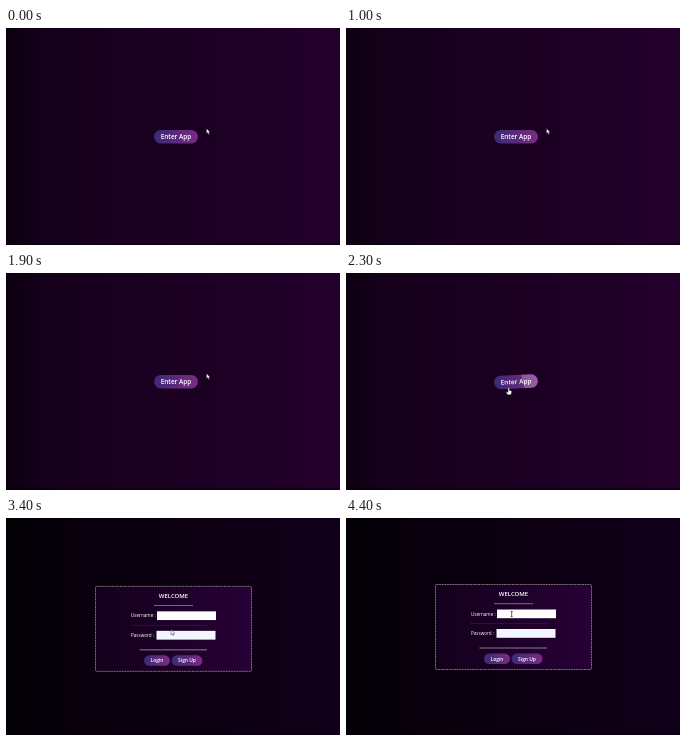
Recreate the animation shown at these times as an HTML page. Size 334 by 217 pixels, loop 4.5 s.

```html
<!DOCTYPE html>
<html lang="en">
<head>
<meta charset="utf-8">
<title>Enter App</title>
<style>
  html, body { margin: 0; width: 100%; height: 100%; overflow: hidden; background: #0c0012; }
  svg { display: block; width: 334px; height: 217px; }
  text { font-family: "Open Sans", "Noto Sans", sans-serif; font-weight: 600; fill: #fff; text-anchor: middle; }
  .label { font-size: 4.6px; font-weight: 500; text-anchor: start; }
</style>
</head>
<body>
<svg viewBox="0 0 334 217">
  <defs>
    <linearGradient id="page">
      <stop offset="0" stop-color="#0c000f"/>
      <stop offset=".1" stop-color="#14001a"/>
      <stop offset=".45" stop-color="#1a0021"/>
      <stop offset="1" stop-color="#22002b"/>
    </linearGradient>
    <linearGradient id="dim">
      <stop offset="0" stop-color="#030005"/>
      <stop offset=".2" stop-color="#08000c"/>
      <stop offset="1" stop-color="#12001a"/>
    </linearGradient>
    <linearGradient id="panel">
      <stop offset="0" stop-color="#14001c"/>
      <stop offset="1" stop-color="#270036"/>
    </linearGradient>
    <linearGradient id="pill">
      <stop offset="0" stop-color="#3b2a74"/>
      <stop offset="1" stop-color="#7a2a84"/>
    </linearGradient>
    <clipPath id="pillClip"><rect x="148" y="102" width="44" height="13.5" rx="6.75"/></clipPath>
  </defs>

  <rect width="334" height="217" fill="url(#page)"/>
  <rect id="shade" width="334" height="217" fill="url(#dim)"/>
  <rect y="215" width="334" height="2" fill="#08000b" opacity=".6"/>

  <g id="enter">
    <rect x="148" y="102" width="44" height="13.5" rx="6.75" fill="url(#pill)"/>
    <path id="shine" d="M175 101H193V117H179Z" fill="#fff" opacity=".23" clip-path="url(#pillClip)"/>
    <text x="170" y="111" font-size="6.45">Enter App</text>
  </g>

  <g id="dialog">
    <rect x="89.5" y="66.5" width="156" height="85" rx="1" fill="url(#panel)" stroke="#8d878c" stroke-width=".8" stroke-dasharray="2 .6"/>
    <text x="167.5" y="78.4" font-size="6">WELCOME</text>
    <path d="M148 85.7H187" stroke="#8f8794" stroke-width=".8"/>
    <path d="M125 105.5H201" stroke="#4a3154" stroke-width=".6" stroke-dasharray="1 .6"/>
    <path d="M133.500 130H201" stroke="#a49ca8" stroke-width=".8"/>
    <text class="label" x="125" y="97.500">Username :</text>
    <text class="label" x="125" y="117">Password :</text>
    <rect x="151" y="91.500" width="59" height="8.700" fill="#fff"/>
    <rect x="150.500" y="111" width="59" height="8.800" fill="#f4f6ff"/>
    <rect x="138" y="135.500" width="26" height="10.500" rx="5.250" fill="url(#pill)"/>
    <rect x="165.500" y="135.500" width="31" height="10.500" rx="5.250" fill="url(#pill)"/>
    <text x="151" y="142.500" font-size="4.900">Login</text>
    <text x="181" y="142.500" font-size="4.900">Sign Up</text>
  </g>

  <g id="cursor">
    <path id="arrow" d="M0 0V5.200L1.200 4.100L2.100 6L3 5.600L2.200 3.800H3.700Z" fill="#fff" stroke="#111" stroke-width=".4"/>
    <path id="hand" d="M-.7 .5Q0 -.5 .7 .5V2.900L2.500 3.300Q3.200 3.600 3 4.500L2.300 7.300H-1.200L-2.600 4.800Q-2.700 3.900 -1.800 4.200L-.7 5Z" fill="#fff" stroke="#111" stroke-width=".4"/>
    <path id="beam" d="M-1 0H1M0 0V5.200M-1 5.200H1" fill="none" stroke="#222" stroke-width=".7"/>
  </g>
</svg>
<script>
const LOOP = 4500, STEP = 100, OPEN = 3200;
const el = id => document.getElementById(id);
const show = (id, on) => el(id).style.display = on ? "" : "none";
const move = (id, value) => el(id).setAttribute("transform", value);

// Cursor stops: time, x, y
const path = [
  [0, 200.5, 100.5], [1900, 200.5, 100.5], [2300, 162.7, 114.5],
  [2400, 165, 111.6], [3700, 165, 111.6], [4200, 165.7, 93.5], [LOOP, 165.7, 93.5]
];

function cursorAt(t) {
  const i = path.findIndex(p => p[0] > t);
  const [t0, x0, y0] = path[i - 1], [t1, x1, y1] = path[i];
  const k = (t - t0) / (t1 - t0), e = k * k * (3 - 2 * k);
  return [x0 + (x1 - x0) * e, y0 + (y1 - y0) * e];
}

function draw(t) {
  const [x, y] = cursorAt(t);
  const open = t >= OPEN;
  const hover = !open && x < 191;

  const wobble = t >= 2200 && t < 3000
    ? -2.4 * Math.cos(Math.PI * (t - 2300) / 200) * (3000 - t) / 700 : 0;
  move("enter", `rotate(${wobble} 170 108.7)`);
  show("enter", !open);
  show("shine", hover);

  // The panel springs up from below and overshoots once
  const u = t - OPEN;
  const drop = 42 * Math.exp(-u / 64) * Math.cos(Math.PI * u / 100);
  move("dialog", `translate(0 ${open && u < 400 ? drop : 0})`);
  show("dialog", open);
  el("dialog").style.opacity = Math.min(1, .5 + u / 400);
  el("shade").style.opacity = open ? Math.min(1, (u + 100) / 300) : 0;

  const typing = open && y < 100;
  move("cursor", `translate(${x} ${y})`);
  show("hand", hover);
  show("beam", typing);
  show("arrow", !hover && !typing);
}

function tick() {
  draw(Math.floor(performance.now() % LOOP / STEP) * STEP);
  requestAnimationFrame(tick);
}
tick();
</script>
</body>
</html>
```
